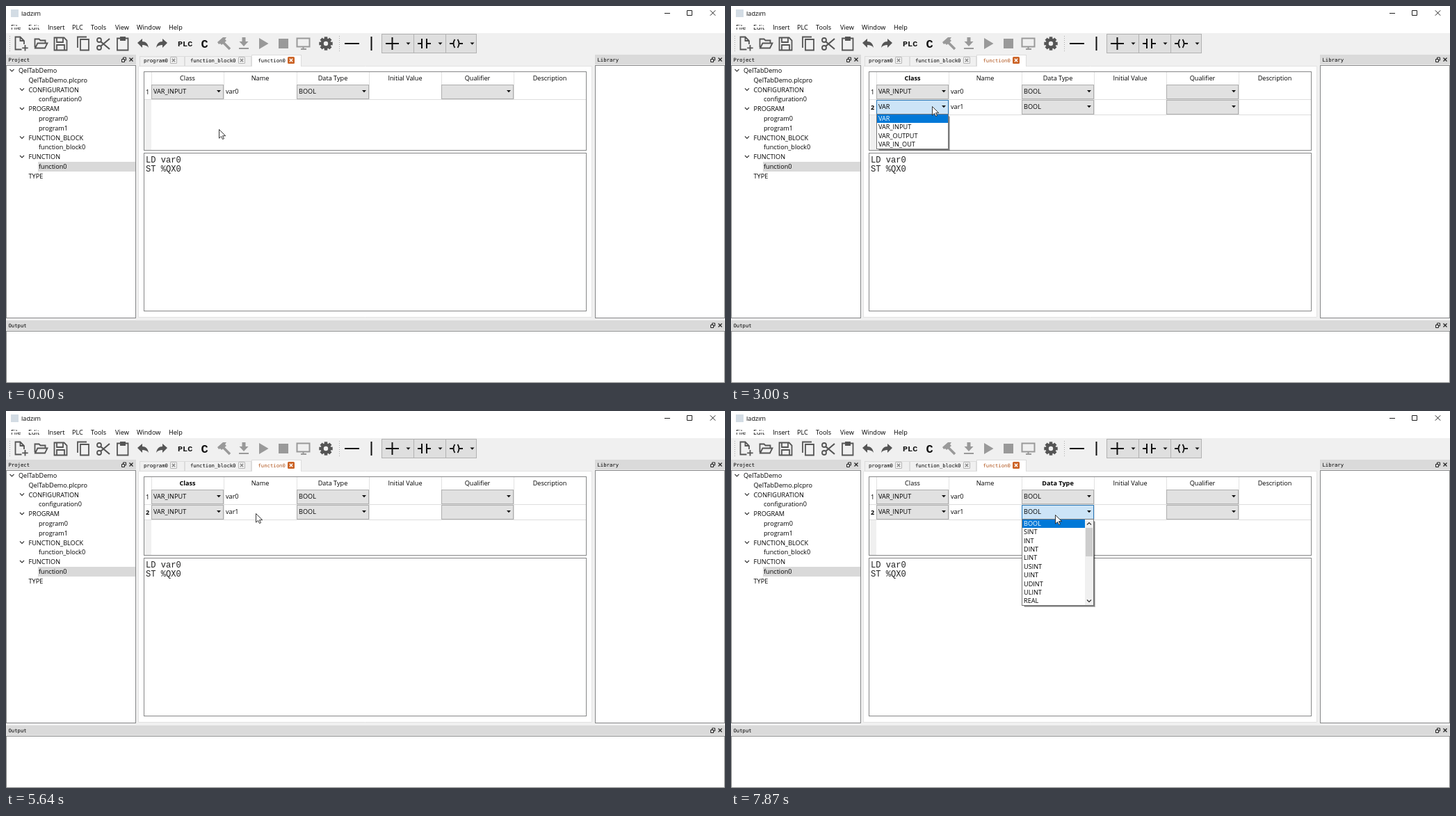
An HTML page with a canvas for the animation above (8 s loop, 1034x542 px).

```html
<!DOCTYPE html>
<html lang="en">
<head>
<meta charset="utf-8">
<title>PLC editor</title>
<style>
html, body { margin: 0; width: 100%; height: 100%; overflow: hidden; background: #f0f0f0; }
canvas { display: block; }
</style>
</head>
<body>
<canvas id="stage" width="1034" height="542"></canvas>
<script>
const ctx = document.getElementById('stage').getContext('2d');
const LOOP = 8000;
const UI = '9.15px "Open Sans", "Noto Sans", sans-serif';
const BOLD = 'bold 9.15px "Open Sans", "Noto Sans", sans-serif';
const MONO = '7.25px "DejaVu Sans Mono", monospace';
const CODE = '12.1px "Liberation Mono", monospace';
const BLUE = '#0078d7', EDGE = '#868788', DARK = '#555', DIM = '#999';
const COLS = [209, 313, 418, 522, 626, 730, 834];
const HEADS = ['Class', 'Name', 'Data Type', 'Initial Value', 'Qualifier', 'Description'];
const CLASSES = ['VAR', 'VAR_INPUT', 'VAR_OUTPUT', 'VAR_IN_OUT'];
const TYPES = ['BOOL', 'SINT', 'INT', 'DINT', 'LINT', 'USINT', 'UINT', 'UDINT', 'ULINT', 'REAL'];
const TREE = [
  [0, 'QelTabDemo', 1], [1, 'QelTabDemo.plcpro'],
  [1, 'CONFIGURATION', 1], [2, 'configuration0'],
  [1, 'PROGRAM', 1], [2, 'program0'], [2, 'program1'],
  [1, 'FUNCTION_BLOCK', 1], [2, 'function_block0'],
  [1, 'FUNCTION', 1], [2, 'function0'], [1, 'TYPE']
];

// Each step: start time, pointer x, y, and what changes in the interface.
const STEPS = [
  [0, 306, 177, { rows: 1, cls: 'VAR', col: -1 }],
  [400, 297, 170],
  [600, 283, 164],
  [800, 283, 164, { menu: 1 }],
  [1000, 296, 171, { menu: 2 }],
  [1180, 304, 174],
  [1600, 304, 174, { menu: 0, rows: 2, edited: true }],
  [2010, 303, 169],
  [2210, 295, 152, { hover: 0 }],
  [2420, 289, 144],
  [2820, 289, 144, { hover: -1, press: 0, col: 0 }],
  [3000, 289, 144, { list: 0, pick: 0 }],
  [3400, 281, 168, { pick: 1 }],
  [3620, 270, 181, { pick: 2 }],
  [4030, 268, 183],
  [4230, 269, 178, { pick: 1 }],
  [4420, 271, 171],
  [5040, 271, 171, { list: -1, cls: 'VAR_INPUT' }],
  [5230, 296, 165, { press: -1 }],
  [5440, 343, 151],
  [5640, 359, 147],
  [5850, 359, 147, { col: 1 }],
  [6460, 358, 147],
  [6670, 356, 147],
  [7280, 402, 148],
  [7480, 464, 149, { hover: 2 }],
  [7680, 466, 149, { hover: -1, press: 2, col: 2 }],
  [7870, 466, 149, { list: 2, pick: 0 }]
];

function stateAt(t) {
  const s = { hover: -1, press: -1, list: -1, pick: 0, menu: 0, edited: false };
  for (const [at, x, y, change] of STEPS) {
    if (at > t) break;
    Object.assign(s, { x, y }, change);
  }
  return s;
}

function rect(x, y, w, h, fill) {
  ctx.fillStyle = fill;
  ctx.fillRect(x, y, w, h);
}

function box(x, y, w, h, fill, edge) {
  rect(x, y, w, h, fill);
  ctx.strokeStyle = edge;
  ctx.lineWidth = 1;
  ctx.strokeRect(x + .5, y + .5, w - 1, h - 1);
}

// The y value is the middle of the capital letters.
function text(str, x, y, font = UI, color = '#000', align = 'left') {
  ctx.font = font;
  ctx.fillStyle = color;
  ctx.textAlign = align;
  ctx.fillText(str, x, y + parseFloat(font.match(/[\d.]+px/)[0]) * .36);
}

function line(d, color = DARK, width = 1) {
  ctx.strokeStyle = color;
  ctx.lineWidth = width;
  ctx.stroke(new Path2D(d));
}

function shape(d, color = DARK) {
  ctx.fillStyle = color;
  ctx.fill(new Path2D(d), 'evenodd');
}

const cross = (x, y, r, color, w) =>
  line(`M${x - r} ${y - r}l${2 * r} ${2 * r}M${x + r} ${y - r}l${-2 * r} ${2 * r}`, color, w);
const arrow = (x, y) => shape(`M${x - 3} ${y - 1.5}h6l-3 3.2z`, '#111');
const chevron = (x, y, dir = 1) => line(`M${x - 3} ${y - 1.5 * dir}l3 ${3 * dir}l3 ${-3 * dir}`, '#333', 1.2);

function shadow(x, y, w, h) {
  rect(x + 4, y + 4, w - 2, h - 2, 'rgba(0,0,0,.25)');
  rect(x + 3, y + 3, w - 2, h - 2, 'rgba(0,0,0,.35)');
}

function dock(title, x, y, w, h) {
  rect(x, y, w, 14, '#dadada');
  text(title, x + 3.5, y + 7.5, MONO);
  const r = x + w;
  line(`M${r - 20.5} ${y + 6.5}h4v4h-4zM${r - 18.5} ${y + 6}v-2h4v4h-2`, '#222');
  cross(r - 7, y + 7, 2.5, '#222', 1.2);
  box(x, y + 15, w, h, '#fff', EDGE);
}

function drawTitle() {
  rect(0, 0, 1034, 39, '#fff');
  rect(7, 5, 11, 11, '#d3dce4');
  text('ladzim', 22, 11);
  rect(20, 4, 30, 4, '#fff');
  line('M947 10.5h8M979.5 6.5h7v7h-7z', '#222');
  cross(1016.5, 10, 3.7, '#222', 1);
  const items = [[7, 'File'], [32, 'Edit'], [60, 'Insert'], [95, 'PLC'], [122, 'Tools'],
    [157, 'View'], [188, 'Window'], [234, 'Help']];
  for (const [x, name] of items) text(name, x, 30.5);
  rect(5, 24, 45, 3, '#fff');
  rect(5, 29, 45, 2, '#fff');
}

function drawIcons() {
  line('M22.5 62.5H13.5V44.5H20.5L26 50V55M20.5 44.5V50H26M27.5 56v8.5M23.2 60.3h8.5', DARK, 1.8);
  line('M41.5 59.5V47.5h6l2 2h7v4M42 60.5l3.5-7h14l-3.5 7z', DARK, 1.8);
  line('M69.5 45.5h14l4 4v14h-18zM73 46v6h9v-6M73 63v-7h11v7', DARK, 1.8);
  line('M107 48h12v15.5h-12zM103 60V44.5h13', DARK, 1.8);
  line('M136 51L149 62M136 58L149 47', DARK, 2.2);
  line('M137 49a3 3 0 1 0-6 0a3 3 0 1 0 6 0M137 60a3 3 0 1 0-6 0a3 3 0 1 0 6 0', DARK, 1.8);
  line('M160 46.5h15.5v17H160z', DARK, 1.8);
  rect(164, 44, 8, 6, DARK);
  shape('M189 53l7-6v4c5 0 8 3 9 9-2-3-5-4-9-4v4z');
  shape('M232 53l-7-6v4c-5 0-8 3-9 9 2-3 5-4 9-4v4z');
  text('PLC', 247, 54, 'bold 11.8px "Liberation Mono", monospace', '#111');
  text('C', 280.5, 54, 'bold 17px "Liberation Mono", monospace', '#111');
  shape('M304 52l8-7h5l-2 3 2 2-7 6-2-2-2 1z', DIM);
  line('M311 51l11 11', DIM, 3.5);
  shape('M339.5 45h5v6h4l-6.5 7-6.5-7h4zM335 60h14v2h-14z', DIM);
  shape('M364 46l13.5 8-13.5 8z', DIM);
  rect(392, 47, 14, 14, DIM);
  line('M418.5 46.5h18v12h-18zM424 62h8M427.5 59v3', DIM, 2);

  ctx.save();
  ctx.translate(460, 54);
  for (let i = 0; i < 8; i++) {
    rect(-2.3, -9.7, 4.6, 5, DARK);
    ctx.rotate(Math.PI / 4);
  }
  shape('M7.5 0a7.5 7.5 0 1 0-15 0a7.5 7.5 0 1 0 15 0M3.2 0a3.2 3.2 0 1 0-6.4 0a3.2 3.2 0 1 0 6.4 0');
  ctx.restore();
}

function drawToolbar() {
  for (const x of [5, 479])
    for (let y = 43; y < 66; y += 3) rect(x, y, 1, 1, '#aaa');
  drawIcons();
  line('M487 54h21M525.5 44v20', '#111', 2);
  for (const x of [540, 586, 632]) {
    box(x, 40, x < 632 ? 47 : 45, 28, '#dfdfdf', '#b2b2b2');
    arrow(x + 38.5, 54);
  }
  line('M546 54h19M555.5 45v18M592 54h6M605 54h6M598 47v14M605 47v14', '#111', 2);
  line('M638 54h5M652 54h5M645.5 48q-4 6 0 12M649.5 48q4 6 0 12', '#111', 1.8);
}

function drawTree() {
  dock('Project', 0, 70, 187, 364);
  rect(46, 224, 140, 14, '#d9d9d9');
  TREE.forEach(([depth, name, open], i) => {
    const y = 92.8 + i * 13.8, x = 18 + depth * 14.5;
    text(name, x, y);
    if (open) chevron(x - 9.5, y - .5);
  });
}

function drawTabs(edited) {
  rect(190, 86, 653, 362, '#fff');
  line('M190.5 448V86.5H842.5V447.5H190', '#e2e2e2');
  for (const [name, x, w, active] of [['program0', 192, 65], ['function_block0', 257, 96], ['function0', 353, 72, 1]]) {
    box(x, active ? 70 : 72, w, active ? 17 : 15, active ? '#fff' : '#f0f0f0', '#dcdcdc');
    if (active) rect(x + 1, 85, w - 2, 3, '#fff');
    text(name, x + (active ? 9.5 : x < 200 ? 6 : 8), 78.5, MONO, active && edited ? '#b0541c' : '#000');
    const cx = x + w - (active ? 15 : x < 200 ? 16 : 14);
    ctx.beginPath();
    ctx.roundRect(cx - 5, 73, 10, 10, 1.5);
    ctx.fillStyle = active ? '#cc6427' : '#b4b4b4';
    ctx.fill();
    if (!active) rect(cx - 4, 74, 8, 8, '#f4f4f4');
    cross(cx, 78, 2.2, active ? '#fff' : '#888', 1.4);
  }
}

function combo(c, y, value, look = 'idle') {
  const [fill, edge] = { idle: ['#e1e1e1', '#adadad'], hover: ['#e5f1fb', BLUE], press: ['#cce4f7', '#2a78b8'] }[look];
  const x = COLS[c], w = COLS[c + 1] - x;
  box(x, y, w, 21, fill, edge);
  text(value, x + 3, y + 10);
  arrow(x + w - 7, y + 9.5);
}

function drawTable(s) {
  box(198, 94, 637, 114, '#fff', EDGE);
  rect(199, 134, 10, 73, '#f0f0f0');
  HEADS.forEach((name, c) => {
    text(name, (COLS[c] + COLS[c + 1]) / 2, 104, s.col === c ? BOLD : UI, '#000', 'center');
    rect(COLS[c], 95, 1, 18, '#e2e2e2');
  });
  for (let r = 0; r < s.rows; r++) {
    const y = 113 + r * 22, last = r === 1;
    rect(199, y, 10, 22, '#fff');
    rect(199, y + 21, 635, 1, '#dedede');
    for (const x of COLS.slice(0, -1)) rect(x, y, 1, 22, '#dedede');
    text(r + 1, 201, y + 10.5, last && s.col >= 0 ? BOLD : UI);
    const picked = last && s.col === 1;
    if (picked) rect(314, y, 104, 21, BLUE);
    text('var' + r, 316, y + 10, UI, picked ? '#fff' : '#000');
    const look = c => !last ? 'idle' : s.press === c ? 'press' : s.hover === c ? 'hover' : 'idle';
    combo(0, y, last ? s.cls : 'VAR_INPUT', look(0));
    combo(2, y, 'BOOL', look(2));
    combo(4, y, '');
  }
}

function drawList(s) {
  if (s.list < 0) return;
  const items = s.list ? TYPES : CLASSES;
  const x = COLS[s.list], w = 104, pitch = 12.4;
  const h = Math.round(items.length * pitch + 1);
  shadow(x, 155, w, h);
  box(x, 155, w, h, '#fff', '#777');
  const inner = s.list ? 90 : w - 2;
  items.forEach((name, i) => {
    const on = i === s.pick;
    if (on) rect(x + 1, 156 + Math.floor(i * pitch), inner, 12, BLUE);
    text(name, x + 3, 161.6 + i * pitch, UI, on ? '#fff' : '#000');
  });
  if (s.list) {
    rect(509, 156, 12, 123, '#f0f0f0');
    rect(510, 168, 10, 41, '#cdcdcd');
    chevron(515, 162, -1);
    chevron(515, 273);
  }
}

function drawMenu(level) {
  if (!level) return;
  shadow(283, 164, 77, 37);
  box(283, 164, 78, 37, '#f2f2f2', '#b0b0b0');
  if (level === 2) rect(285, 166, 73, 17, '#91c9f7');
  text('Insert', 308, 175);
  text('Remove', 308, 191);
}

function drawPointer(x, y) {
  ctx.save();
  ctx.translate(x + .5, y + .5);
  const d = 'M0 0V12.6L3 9.9L5 14L7 13.2L5 9.2H9.2Z';
  shape(d, '#fff');
  line(d, '#222', .9);
  ctx.restore();
}

function draw(t) {
  const s = stateAt(t);
  rect(0, 0, 1034, 542, '#f0f0f0');
  drawTitle();
  drawToolbar();
  drawTree();
  dock('Library', 847, 70, 187, 364);
  dock('Output', 0, 452, 1034, 75);
  drawTabs(s.edited);
  drawTable(s);
  box(198, 211, 637, 228, '#fff', EDGE);
  text('LD var0', 201, 220.6, CODE, '#222');
  text('ST %QX0', 201, 233.6, CODE, '#222');
  drawList(s);
  drawMenu(s.menu);
  drawPointer(s.x, s.y);
}

const start = performance.now();
function tick() {
  draw((performance.now() - start) % LOOP);
  requestAnimationFrame(tick);
}
tick();
</script>
</body>
</html>
```
